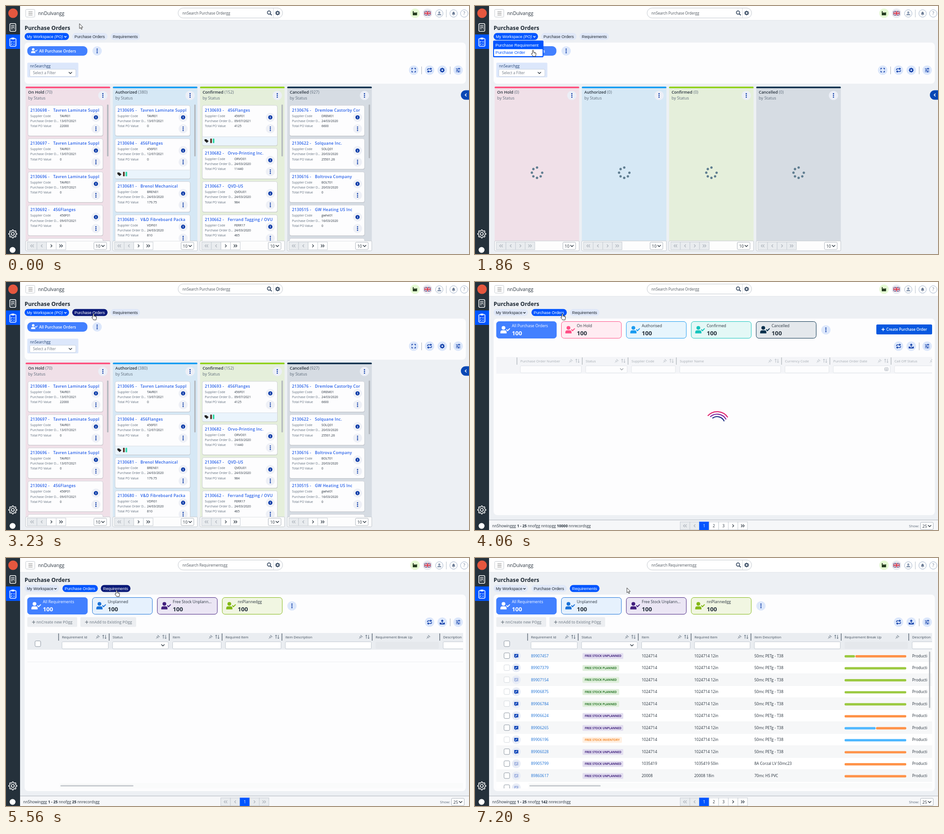
An HTML page for the animation above (7460 ms loop, 1021 px wide and 549 px high).

```html
<!DOCTYPE html>
<html lang="en">
<head>
<meta charset="utf-8">
<title>Purchase Orders</title>
<style>
html, body { margin: 0; width: 100%; height: 100%; overflow: hidden; background: #edf0f4; }
#stage { display: block; width: 100vw; height: 100vh; }
text { font-family: "Open Sans", "Noto Sans", sans-serif; }
.ui { font-family: "Liberation Sans", Arial, sans-serif; }
.b { font-weight: 700; }
.sb { font-weight: 600; }
</style>
</head>
<body>
<svg id="stage" viewBox="0 0 1021 549" preserveAspectRatio="none"></svg>
<script>
const LOOP = 7460;
const BLUE = '#0055ff', NAVY = '#0b3ba8', INK = '#26313c', GREY = '#5d6b7a', RIM = '#c6ccd3';

// Drawing helpers
const edge = (color = RIM, w = 1) => `stroke="${color}" stroke-width="${w}"`;
const rect = (x, y, w, h, fill, r = 0, more = '') =>
  `<rect x="${x}" y="${y}" width="${w}" height="${h}" rx="${r}" fill="${fill}" ${more}/>`;
const dot = (x, y, r, fill, more = '') => `<circle cx="${x}" cy="${y}" r="${r}" fill="${fill}" ${more}/>`;
const line = (d, color, w = 1) => `<path d="${d}" fill="none" ${edge(color, w)}/>`;
const shape = (d, fill, more = '') => `<path d="${d}" fill="${fill}" ${more}/>`;
const text = (x, y, s, size, fill = INK, more = '') =>
  `<text x="${x}" y="${y}" font-size="${size}" fill="${fill}" ${more}>${s}</text>`;
const at = (x, y, body, scale = 1) => `<g transform="translate(${x} ${y}) scale(${scale})">${body}</g>`;
const group = (id, body) => `<g id="${id}">${body}</g>`;
const clip = (x, y, w, h, body) =>
  `<svg x="${x}" y="${y}" width="${w}" height="${h}" viewBox="${x} ${y} ${w} ${h}">${body}</svg>`;
const each = (list, fn) => list.map(fn).join('');
const bold = s => `<tspan class="b">${s}</tspan>`;

// Icons
const down = (x, y, color = INK, s = 3.5, w = 1.3) => line(`M${x - s} ${y - s / 2}l${s} ${s} ${s} ${-s}`, color, w);
const side = (x, y, dir, color, w = 1.2) => line(`M${x - dir * 1.5} ${y - 3}l${dir * 3} 3 ${-dir * 3} 3`, color, w);
const plus = (x, y, color) => line(`M${x - 3.5} ${y}h7M${x} ${y - 3.5}v7`, color, 1.6);
const kebab = (x, y, fill = '#dce7fb', r = 10.3) =>
  dot(x, y, r, fill) + each([-3.8, 0, 3.8], d => dot(x, y + d, 1.35, NAVY));

function gear(x, y, r, paint) {
  const pts = Array.from({ length: 32 }, (_, i) => {
    const a = (i - .5) * Math.PI / 16, k = i % 4 < 2 ? r : r * .76;
    return `${(x + k * Math.cos(a)).toFixed(2)} ${(y + k * Math.sin(a)).toFixed(2)}`;
  });
  const h = r * .36;
  return `<path d="M${pts.join('L')}ZM${x - h} ${y}a${h} ${h} 0 1 0 ${2 * h} 0a${h} ${h} 0 1 0 ${-2 * h} 0Z" fill-rule="evenodd" stroke-linejoin="round" ${paint}/>`;
}
const userCheck = (x, y, color, s = 1) => at(x, y,
  dot(-3, -4.5, 4.2, color) + shape('M-10 8v-2.500q0-4.500 4.500-4.500h5q4.500 0 4.500 4.500V8Z', color) +
  line('M3.500-1l2.800 2.800 5-5', color, 2), s);
const pin = (x, y, c) => at(x, y, line('M-.5-4l4.500 4.500M1-2.500l-3 2.500M2.500-1L0 2M-3-.5L.5 3M-1.500 1.500L-4 4', c, .9));
const sort = (x, y, c) => at(x, y, line('M-2.500 4V-4M-4.500-2l2-2 2 2M2.500-4V4M.5 2l2 2 2-2', c, 1));
const sync = line('M-4.500 0v-1q0-2 2-2H4M2-5l2.200 2L2-1M4.500 0v1q0 2-2 2H-4M-2 1l-2.200 2 2.200 2', NAVY, 1.5);
const sliders = line('M-5-3.500H5M-5 0H5M-5 3.500H5', NAVY, 1.2) + dot(2, -3.5, 1.4, NAVY) + dot(-2, 0, 1.4, NAVY) + dot(1, 3.5, 1.4, NAVY);
const expand = line('M-4-1.500V-4H-1.500M1.500-4H4V-1.500M4 1.500V4H1.500M-1.500 4H-4V1.500', NAVY, 1.4);
const upload = line('M0 2V-4M-2.500-2L0-4.500 2.500-2', NAVY, 1.6) + shape('M-5.500 1h3v2h5v-2h3v4h-11Z', NAVY);
const gearIcon = gear(0, 0, 5.5, `fill="${NAVY}"`);
const tool = (x, icon) => dot(x, 142, 10.5, '#dce7fb') + at(x, 142, icon);
const split = x => line(`M${x} 134V151`, '#aab3bf');

const arrows = { '«': [-1, 2], '‹': [-1, 1], '›': [1, 1], '»': [1, 2] };
function pager(x, y, h, cells, off = '', current = '') {
  return each([...cells], (c, i) => {
    const cx = x + i * 21.2, mid = y + h / 2, on = c === current, dim = off.includes(c);
    const mark = arrows[c]
      ? each(arrows[c][1] > 1 ? [-2, 2] : [0], d => side(cx + 10.6 + d, mid, arrows[c][0], dim ? '#aab1b9' : INK))
      : text(cx + 10.6, mid + 3, c, 8.5, on ? '#fff' : INK, 'text-anchor="middle"');
    return rect(cx, y, 21.2, h, on ? BLUE : dim ? '#e9ecef' : '#fff', 0, edge(on ? BLUE : RIM)) + mark;
  });
}
const pick = (x, y, n) => rect(x, y, 28, 16, '#fff', 2, edge('#aeb5bd')) + text(x + 4, y + 11.5, n, 9) + down(x + 20, y + 8);

// Frame around the pages
const shell = rect(0, 0, 1021, 549, '#edf0f4') + rect(31, 0, 990, 31, '#fff') + rect(31, 31, 990, 1, '#e2e6eb') +
  rect(43.5, 7.5, 20, 17, '#fff', 2, edge('#c4c9cf')) + line('M49.500 13h9M49.500 16.500h9M49.500 20h9', '#777', 1) +
  text(71, 20, 'nnDulvangg', 10.3) +
  rect(379.5, 4.5, 230.5, 22, '#fff', 11, edge('#c3c8ce')) + line('M589.500 5v21', '#d5d9de') +
  dot(580, 14.5, 3.6, 'none', edge('#3c4f66', 1.7)) + line('M582.700 17.200l3.300 3.300', '#3c4f66', 2) + gear(599, 15.5, 5.4, 'fill="#3c4f66"') +
  dot(902, 16, 10.5, '#e6fbd5') + shape('M897 20.500v-9h2v4l3.500-2v2l4-2v7Z', '#21381c') +
  dot(929.5, 16, 10.5, '#e9ebf2') + clip(922, 11, 15, 10, rect(922, 11, 15, 10, '#23357f') +
    line('M922 11l15 10M937 11l-15 10', '#fff', 2) + line('M922 11l15 10M937 11l-15 10', '#d22c43', .7) +
    line('M929.500 11v10M922 16h15', '#fff', 3.6) + line('M929.500 11v10M922 16h15', '#d22c43', 2)) +
  each([955.5, 987, 1010.5], x => dot(x, 16.5, 8.2, '#fff', edge('#9fb0c8'))) +
  dot(955.5, 14.2, 2.3, '#8797b0') + shape('M951 20.500q0-3.500 4.500-3.500t4.500 3.500Z', '#8797b0') + line('M971 8v17', '#b3bcc8') +
  shape('M983 19q1.500-1 1.500-4 .5-2.500 2.500-2.500t2.500 2.500q0 3 1.500 4ZM986 19.800h2v1h-2Z', '#6f7f98') +
  text(1010.5, 20.3, '?', 10, '#6f7f98', 'text-anchor="middle"') +
  rect(0, 0, 31, 549, '#25313b') + rect(0, 63, 31, 32, BLUE) + dot(15.5, 16, 10.5, '#e5573f') + dot(14.5, 540, 6.5, '#fff') +
  rect(8.5, 39, 13, 17, 'none', 2, edge('#fff', 1.6)) + line('M11 43.500h8M11 47h8M11 50.500h4M17 50.500h2', '#fff', 1.4) +
  rect(8.5, 72, 13.5, 17, 'none', 2, edge('#fff', 1.6)) + rect(12, 70, 6.5, 4, '#fff', 1) +
  line('M10.500 79l1.200 1.200 2-2M15.500 79.500h4.500M10.500 84l1.200 1.200 2-2M15.500 84.500h4.500', '#fff', 1.2) +
  gear(15, 504.500, 9, `fill="none" ${edge('#fff', 1.5)}`) +
  text(41, 52.500, 'Purchase Orders', 12.2, '#1c2732', 'class="b"');
const searchText = what => text(389, 19, `nnSearch ${what}gg`, 8.1, '#4c545c');

const tabLabels = ['My Workspace', 'Purchase Orders', 'Requirements'];
function tabs(boxes, active, hover) {
  return each(boxes, ([x, w], i) => {
    const fill = i === hover ? '#0a1a78' : i === active ? BLUE : '#e0e8f8';
    const ink = i === hover || i === active ? '#fff' : '#1d2630';
    const label = tabLabels[i] + (i === 0 && active === 0 ? ' <tspan font-style="italic">(PO)</tspan>' : '');
    return rect(x, 59.800, w, 15.500, fill, 7.7) + text(x + 5, 70.500, label, 8.850, ink, 'class="ui"') +
      (i ? '' : down(x + w - 8, 68, ink, 2.400, 1.400));
  });
}
const boardTabs = [[41, 98], [146, 78], [230.500, 65]], gridTabs = [[41, 76], [124.500, 78], [209, 65.500]];

// Board
const columns = [
  { name: 'On Hold', count: 70, color: '#ff4f7d', bg: '#f0e0e8', cards: [
    ['2130698', 'Tavren Laminate Suppl', 'TAVR01', '13/07/2021', '22000'],
    ['2130697', 'Tavren Laminate Suppl', 'TAVR01', '13/07/2021', '0'],
    ['2130696', 'Tavren Laminate Suppl', 'TAVR01', '13/07/2021', '0'],
    ['2130692', '456Flanges', '456F01', '09/07/2021', '0'], ['']] },
  { name: 'Authorized', count: 380, color: '#129bf2', bg: '#d6e8f5', cards: [
    ['2130695', 'Tavren Laminate Suppl', 'TAVR01', '13/07/2021', '0'],
    ['2130694', '456Flanges', '456F01', '12/07/2021', '0', true],
    ['2130681', 'Brenol Mechanical', 'BREN01', '24/03/2020', '179.75'],
    ['2130680', 'V&amp;D Fibreboard Packa', 'VDFI01', '24/03/2020', '810']] },
  { name: 'Confirmed', count: 152, color: '#8fd118', bg: '#e5efdb', cards: [
    ['2130693', '456Flanges', '456F01', '09/07/2021', '4125', true],
    ['2130682', 'Orvo-Printing Inc.', 'ORVO01', '24/03/2020', '11440'],
    ['2130667', 'QVD-US', 'QVDU01', '24/03/2020', '984'],
    ['2130662', 'Ferrand Tagging / OVU', 'FERR17', '24/03/2020', '465']] },
  { name: 'Cancelled', count: 927, color: '#07304d', bg: '#d6dce3', cards: [
    ['2130676', 'Dremlow Castorby Cor', 'DREM01', '24/03/2020', '6600'],
    ['2130622', 'Solquane Inc.', 'SOLQ01', '20/03/2020', '25501.26'],
    ['2130616', 'Boltrova Company', 'BOLT01', '20/03/2020', '0'],
    ['2130515', 'GW Heating US Inc', 'gwhe01', '16/03/2020', '0'], ['']] },
];
const columnX = i => 43.300 + 192.300 * i;

function card(x, y, [number, name, code, date, value, tagged]) {
  const h = tagged ? 89 : 67.500, title = 'class="sb" letter-spacing=".34"';
  let out = rect(x + 5, y + 1, 166, h, '#00000022', 4) + rect(x + 5, y, 165.500, h, '#fdfdfe', 4, edge('#c9ccd2', .8));
  if (tagged) out += rect(x + 5.500, y + 70, 164.500, 18.500, '#eaf4fc', 3) + line(`M${x + 5} ${y + 69.500}h165`, '#d5dde5') +
    shape(`M${x + 10} ${y + 75}h4l5 4-4 4-5-4.500Z`, '#222') + rect(x + 22.500, y + 73.500, 3.600, 10, '#5b3023', 1) + rect(x + 28, y + 73.500, 3.600, 10, '#2fd9a8', 1);
  if (!number) return out;
  out += clip(x + 9, y + 2, 157, 16, text(x + 10.500, y + 13.500, number + ' -', 8.600, '#1f5be8', title) +
    text(x + 61, y + 13.500, name, 8.600, '#1f5be8', title));
  each([['Supplier Code', code], ['Purchase Order D...', date], ['Total PO Value', value]], ([label, v], i) => {
    const by = y + 25.500 + i * 11.200;
    out += text(x + 10.500, by, label, 6.900, GREY) + text(x + 75.500, by, v, 6.900, INK);
  });
  return out + dot(x + 155, y + 26.500, 10, '#eef0f6') + dot(x + 155, y + 26.500, 4.600, NAVY) +
    text(x + 155, y + 29, 'i', 7, '#fff', 'class="b" text-anchor="middle"') + kebab(x + 155, y + 51.800, '#eef0f6', 10);
}
function cardStack(i) {
  const x = columnX(i);
  let y = 220;
  const list = each(columns[i].cards, c => {
    const out = card(x, y, c);
    y += c[5] ? 95 : 73.600;
    return out;
  });
  return clip(x, 214, 186.500, 306, list + rect(x + 179.500, 218, 3.200, i === 3 ? 119 : 115, '#b4b8be', 1.600));
}
function columnInfo(i, count, off) {
  const x = columnX(i);
  return text(x + 5.500, 193.500, `<tspan class="sb" fill="${INK}">${columns[i].name}</tspan> (${count})`, 9, GREY) +
    pager(x + 3.700, 522.500, 17, '«‹›»', off);
}
const spinnerDots = each([2, 3, 4, 5, 6, 7, 8], k =>
  dot(11.400 * Math.sin(k * Math.PI / 4), -11.400 * Math.cos(k * Math.PI / 4), 2.600, '#5f7d90'));
const column = ({ color, bg }, i) => {
  const x = columnX(i);
  return rect(x, 178.500, 186.500, 364, bg, 3) + rect(x, 178.500, 186.500, 3.600, color, 1.500) +
    text(x + 5.500, 207, 'by Status', 9, GREY) + kebab(x + 170.300, 198, '#eceff7') +
    rect(x, 520, 186.500, 22, '#fdfdfd', 2, edge('#c3c8ce')) + pick(x + 150.500, 523, 10) +
    group('busy' + i, columnInfo(i, 0, '«‹›»') + at(x + 93.500, 369, `<g class="wheel">${spinnerDots}</g>`)) +
    group('info' + i, columnInfo(i, columns[i].count, '«‹')) + group('cards' + i, cardStack(i));
};
const board = rect(41, 81, 973, 91, '#fdfdfe', 8) +
  rect(47, 89, 132.500, 21, '#4280ff', 9) + userCheck(62, 99, '#fff', .66) +
  text(73, 102.700, 'All Purchase Orders', 8.600, '#fff', 'class="sb"') + kebab(201, 99.500) +
  rect(47, 125.500, 112.500, 32.500, '#dce7fb', 2) + text(53, 136, 'nnSearchgg', 8.300, '#1d3f70') +
  rect(52.500, 140, 101.500, 16, '#fff', 2, edge('#c6d0de')) + text(59.500, 151.300, 'Select a Filter', 8.200, '#707a86') + down(142, 148) +
  tool(899, expand) + split(916.500) + tool(934, sync) + tool(962, gearIcon) + split(979.500) + tool(997, sliders) +
  each(columns, column) + group('peek', clip(693, 349, 40, 40, cardStack(3))) +
  shape('M1021 186.500h-7.500a10.500 10.500 0 0 0 0 21h7.500Z', '#0747b5') + side(1014, 197, -1, '#fff', 1.600);

// Grid pages
const stats = list => each(list, ([label, color, bg], i) => {
  const x = 47.300 + i * 143.200, ink = i ? INK : '#fff';
  return rect(x, 87.500, 132.300, 37, bg, 6, edge(color)) + userCheck(x + 18.500, 106, i ? color : '#fff', .98) +
    text(x + 34, 100.300, label, 8.700, ink) + text(x + 34, 118, '100', 13.200, ink, 'class="b"');
}) + kebab(47.300 + list.length * 143.200 + 10.500, 106);

const gridHead = cols => clip(47, 160, 961, 50, rect(47, 166, 961, 37, '#eaedf1') + each(cols, ([x, label, kind], i) => {
  const end = cols[i + 1] ? cols[i + 1][0] : 1032, left = x + 7.500, w = end - left - 2;
  return line(`M${x} 167v16`, '#4c5a68', 1.300) + text(left, 178, label, 7.700, '#3f4c5a') +
    (label === 'Description' ? '' : pin(end - 25, 174.500, GREY)) + (kind === 'bar' || label === 'Description' ? '' : sort(end - 10.500, 174.500, GREY)) +
    rect(left, 185.500, w, 15.500, kind === 'bar' ? '#e5e8ec' : '#fff', 2, kind === 'bar' ? '' : edge('#c3cad2')) +
    (kind === 'pick' ? down(end - 14, 193) : '') +
    (kind === 'date' ? rect(end - 14, 189.500, 7.500, 7, 'none', 1, edge(GREY)) + line(`M${end - 14} 192h7.500M${end - 14} 194.300h7.500M${end - 10.300} 191v5`, GREY, .8) : '');
}));
const gridPage = rect(41, 81, 973, 435, '#fdfdfe', 8) + tool(934, sync) + tool(962, upload) + split(979.500) + tool(997, sliders) +
  rect(31, 526, 990, 23, '#f6f7f9') + rect(31, 526, 990, 1.500, '#c3c8ce') +
  text(957, 543, 'Show:', 8, GREY) + pick(982.500, 532, 25);
const showing = (total, top = '') => text(38, 543, `nnShowinggg ${bold('1 - 25')} nnofgg ${top}${bold(total)} nnrecordsgg`, 8.400);
const rowBand = i => rect(47, 203.200 + i * 26.550, 961, 26.550, i % 2 ? '#fff' : '#f6f7f8') + line(`M47 ${229.750 + i * 26.550}h961`, '#eaecef', .8);
const rowText = (x, y, s, fill = INK) => text(x, y + 3, s, 8.500, fill);

const orderList = columns.flatMap(c => c.cards.filter(r => r[0]).map(r => [c.name, ...r])).sort((a, b) => b[1] - a[1]);
const orderRows = clip(47, 203, 961, 307, each(orderList.slice(0, 12), ([status, number, name, code, date], i) => {
  const y = 216.500 + i * 26.550;
  return rowBand(i) + rowText(100, y, number, '#1a6fd4') + rowText(244, y, status) + rowText(345, y, code) + rowText(452, y, name) + rowText(790, y, date);
}));
const orders = gridPage + stats([
    ['All Purchase Orders', '#4280ff', '#4280ff'], ['On Hold', '#ff4f86', '#ffecf2'], ['Authorised', '#1a9bf0', '#e7f5fd'],
    ['Confirmed', '#15c4bd', '#e4f8f6'], ['Cancelled', '#06304d', '#e4e8ec']]) +
  rect(885, 94, 123, 22, '#0758e0', 2.500) + plus(900, 105, '#fff') + text(907, 108, 'Create Purchase Order', 8.200, '#fff', 'class="sb"') +
  group('orderHead', gridHead([[92.500, 'Purchase Order Number'], [236.500, 'Status', 'pick'], [337.500, 'Supplier Code'], [444, 'Supplier Name'],
    [676, 'Currency Code'], [782.500, 'Purchase Order Date', 'date'], [917.500, 'Call Off Status']])) +
  group('orderRows', orderRows) + showing(10000, 'nntopgg ') + pager(452.500, 531, 17.500, '«‹123›»', '«‹', '1');

const badges = { U: ['UNPLANNED', '#e3def0', '#43267f', 90], P: ['PLANNED', '#e0efdc', '#2d7a2c', 81], I: ['INVENTORY', '#fff0e2', '#f58a2c', 87] };
const barColors = { g: '#9bc940', o: '#ff9248', b: '#4fb8ff' };
// number, status, bars, first bar share, c: selectable / e: editable, item, size, description
const requirementList = [
  ['89907457', 'U', 'go', .175, 'ce'], ['89907379', 'P', 'g', 1, 'e'], ['89907154', 'P', 'g', 1, ''], ['89906875', 'P', 'g', 1, 'e'],
  ['89906784', 'P', 'g', 1, 'e'], ['89906624', 'U', 'o', 1, 'ce'], ['89906265', 'U', 'bo', .51, 'ce'], ['89906196', 'I', 'b', 1, 'e'],
  ['89906028', 'U', 'o', 1, 'ce'], ['89905799', 'U', 'o', 1, 'c', '1035419', '50in', '8A Corzal LV 50mc23'],
  ['89860617', 'U', 'o', 1, 'c', '20008', '18in', '70mc HS PVC'], ['', 'U', 'o', 1, 'c'],
];
const checkbox = (y, on = true) => rect(64, y - 6, 12.500, 12.500, '#fff', 2.500, edge(on ? '#8a949f' : '#d3d8dd'));
function requirementRow([id, status, bars, share, flags, item = '1024714', size = '12in', about = '50mc PETg - T38'], i) {
  const y = 216.500 + i * 26.550, [word, bg, ink, w] = badges[status], cut = 136 * share;
  const editor = flags.includes('e') ? '#1147b8' : '#a9b9e2';
  const head = rowBand(i) + checkbox(y - .500, flags.includes('c')) + dot(91, y, 9.800, '#e9edf6') +
    shape(`M86.500 ${y - 4}h9v7.500h-4l-2 2v-2h-3Z`, editor) + line(`M89 ${y + 1.500}l3.500-3.500`, '#fff', 1.200);
  if (!id) return head;
  return head + rowText(123.500, y, id, '#1a6fd4') +
    rect(237, y - 6, w, 13, bg, 2) + text(242, y + 2.800, 'FREE STOCK ' + word, 6.500, ink, 'class="b"') +
    rowText(367.500, y, item) + rowText(483.500, y, `${item} ${size}`) + rowText(616, y, about) +
    rect(815, y - 1.500, cut - (bars[1] ? 1 : 0), 5.200, barColors[bars[0]], 2) +
    (bars[1] ? rect(815 + cut, y - 1.500, 136 - cut, 5.200, barColors[bars[1]], 2) : '') +
    clip(960, y - 10, 37.500, 20, rowText(964, y, 'Production'));
}
const scrollThumb = w => rect(118, 498, 890, 12, '#fafbfb') + rect(120, 502.800, w, 3, '#c6cacf', 1.500);
const requirements = gridPage + stats([
    ['All Requirements', '#4280ff', '#4280ff'], ['Unplanned', '#1a72d9', '#e6f1fd'], ['Free Stock Unplann...', '#44207f', '#ebe6f4'], ['nnPlannedgg', '#82b814', '#f1f6e2']]) +
  each([[47, 110, 'nnCreate new POgg'], [164, 123, 'nnAdd to Existing POgg']], ([x, w, s]) =>
    rect(x, 131, w, 21.500, '#eceef1', 2) + plus(x + 14, 142, '#7d8790') + text(x + 20, 145, s, 8.400, '#87909a', 'class="sb"')) +
  group('needHead', gridHead([[116, 'Requirement Id'], [227.500, 'Status', 'pick'], [360, 'Item'], [476.500, 'Required Item'],
    [608.500, 'Item Description'], [807.500, 'Requirement Break Up', 'bar'], [956.500, 'Description']]) + checkbox(189.500)) +
  line('M47 230h961', '#eceef0') + scrollThumb(161) +
  group('needRows', clip(47, 203, 961, 307, each(requirementList, requirementRow) + scrollThumb(157) + rect(1001, 207, 3, 125, '#b9bdc2', 1.500))) +
  group('pagesShort', showing(25) + pager(473.700, 531, 17.500, '«‹1›»', '«‹›»', '1')) +
  group('pagesFull', showing(142) + pager(452.500, 531, 17.500, '«‹123›»', '«‹', '1'));

// Overlays
const menuItem = (y, label, ink) => text(45, y, label, 9.300, ink, 'class="ui"');
const menu = rect(40, 76.500, 111, 37, BLUE, 2) + menuItem(90, 'Purchase Requirement', '#fff') + menuItem(106, 'Purchase Order', '#fff') +
  group('menu0', rect(42, 79, 107, 15.500, '#fff', 1) + menuItem(90, 'Purchase Requirement', BLUE)) +
  group('menu1', rect(42, 95.500, 107, 15.500, '#fff', 1) + menuItem(106, 'Purchase Order', BLUE));
const tooltip = rect(70, 68, 87.500, 18.500, '#555f69', 2) + text(76, 80.300, 'All Purchase Orders', 8.200, '#fff');
const loader = at(534, 315, each([[28, '#e0246e'], [22.500, '#7a1f9c'], [17, '#14277f']], ([r, color], i) => {
  const sx = r * .79, sy = -r * .61;
  return `<g transform="rotate(${i * 5 + 4})">${line(`M${-sx} ${sy}A${r} ${r} 0 0 1 ${sx} ${sy}`, color, 2.200)}</g>`;
}));
const arrowCursor = shape('M0 0V11l2.500-2.300 1.700 4 1.700-.7-1.700-3.900H7.500Z', '#fff', edge('#111', .8));
const handCursor = at(-4, 0, shape('M2.700 8.500V1.500q1.300-1.700 2.400 0V5.500l4 .8q1.700.5 1.500 2.200L9.600 14.500H4.200L.5 9.300q-.2-1.600 1.200-1.300Z', '#fff', edge('#111', .9)) +
  line('M6.800 6v2.300M8.700 6.500v2', '#111', .6));

document.getElementById('stage').innerHTML = shell +
  group('findOrder', searchText('Purchase Order')) + group('findNeed', searchText('Requirements')) +
  group('board', board) + group('orders', orders) + group('needs', requirements) +
  group('tabs0', tabs(boardTabs, 0)) + group('tabs1', tabs(boardTabs, 0, 1)) + group('tabs2', tabs(gridTabs, 1)) +
  group('tabs3', tabs(gridTabs, 1, 2)) + group('tabs4', tabs(gridTabs, 2)) +
  group('menu', menu) + group('tooltip', tooltip) + at(0, 0, group('loader', `<g id="loaderSpin">${loader}</g>`)) +
  group('cursor', group('arrow', arrowCursor) + group('hand', handCursor));

// Timeline
const parts = Object.fromEntries([...document.querySelectorAll('g[id]')].map(el => [el.id, el]));
const wheels = document.querySelectorAll('.wheel');
const moves = [[200, 162, 39], [650, 115, 64], [1000, 115, 64], [1600, 128, 97], [2150, 128, 97], [2490, 181, 90], [2560, 181, 90],
  [2630, 191, 89], [2960, 191, 89], [3230, 193, 69.500], [4760, 193, 69.500], [4960, 244, 71], [6700, 244, 71], [7200, 335, 66]];
const ready = [2250, 2330, 2410, 2490];
const during = (t, a, b) => t >= a && t < b;
const ramp = (t, a, b) => Math.min(1, Math.max(0, (t - a) / (b - a)));
const show = (id, on) => { parts[id].style.display = on ? '' : 'none'; };
const fade = (id, v) => { parts[id].style.opacity = v; show(id, v > 0); };

function pointer(t) {
  const next = moves.findIndex(m => m[0] > t);
  if (next === 0) return moves[0].slice(1);
  if (next < 0) return moves[moves.length - 1].slice(1);
  const [a, b] = [moves[next - 1], moves[next]], k = ramp(t, a[0], b[0]), e = k * k * (3 - 2 * k);
  return [a[1] + (b[1] - a[1]) * e, a[2] + (b[2] - a[2]) * e];
}

function render(t) {
  const [x, y] = pointer(t), isHand = during(t, 500, 2470) || during(t, 3090, 6900);
  parts.cursor.setAttribute('transform', `translate(${x} ${y})`);
  show('hand', isHand);
  show('arrow', !isHand);

  const onBoard = t < 3640, onNeeds = t >= 5555;
  show('board', onBoard);
  show('orders', !onBoard && !onNeeds);
  show('needs', onNeeds);
  show('findOrder', !onNeeds);
  show('findNeed', onNeeds);
  const tab = [3100, 3640, 4860, 5640].filter(s => t >= s).length;
  for (let i = 0; i < 5; i++) show('tabs' + i, i === tab);

  ready.forEach((end, i) => {
    const busy = during(t, 1800, end);
    show('busy' + i, busy);
    show('info' + i, !busy);
    show('cards' + i, !busy && !(i === 3 && during(t, end, 2530)));
  });
  show('peek', during(t, 2490, 2530));
  wheels.forEach(w => w.setAttribute('transform', `rotate(${(t - 1860) * .18})`));

  show('menu', during(t, 740, 1960));
  show('menu0', y >= 80 && y < 94);
  show('menu1', y >= 94);
  fade('tooltip', during(t, 2100, 2530) ? ramp(t, 2100, 2180) * (1 - .7 * ramp(t, 2420, 2500)) * .9 : 0);

  const ordersBusy = during(t, 3740, 4400), needsBusy = during(t, 5600, 6330);
  show('loader', ordersBusy || needsBusy);
  parts.loaderSpin.setAttribute('transform', `rotate(${(t - 4060) * .36} 534 315)`);
  fade('orderHead', t < 4400 ? .45 : 1);
  fade('orderRows', ramp(t, 4400, 4460));
  fade('needHead', needsBusy ? .45 : 1);
  fade('needRows', ramp(t, 6330, 6530));
  show('pagesShort', t < 6250);
  show('pagesFull', t >= 6250);
}

function tick() {
  render(performance.now() % LOOP);
  requestAnimationFrame(tick);
}
tick();
</script>
</body>
</html>
```
